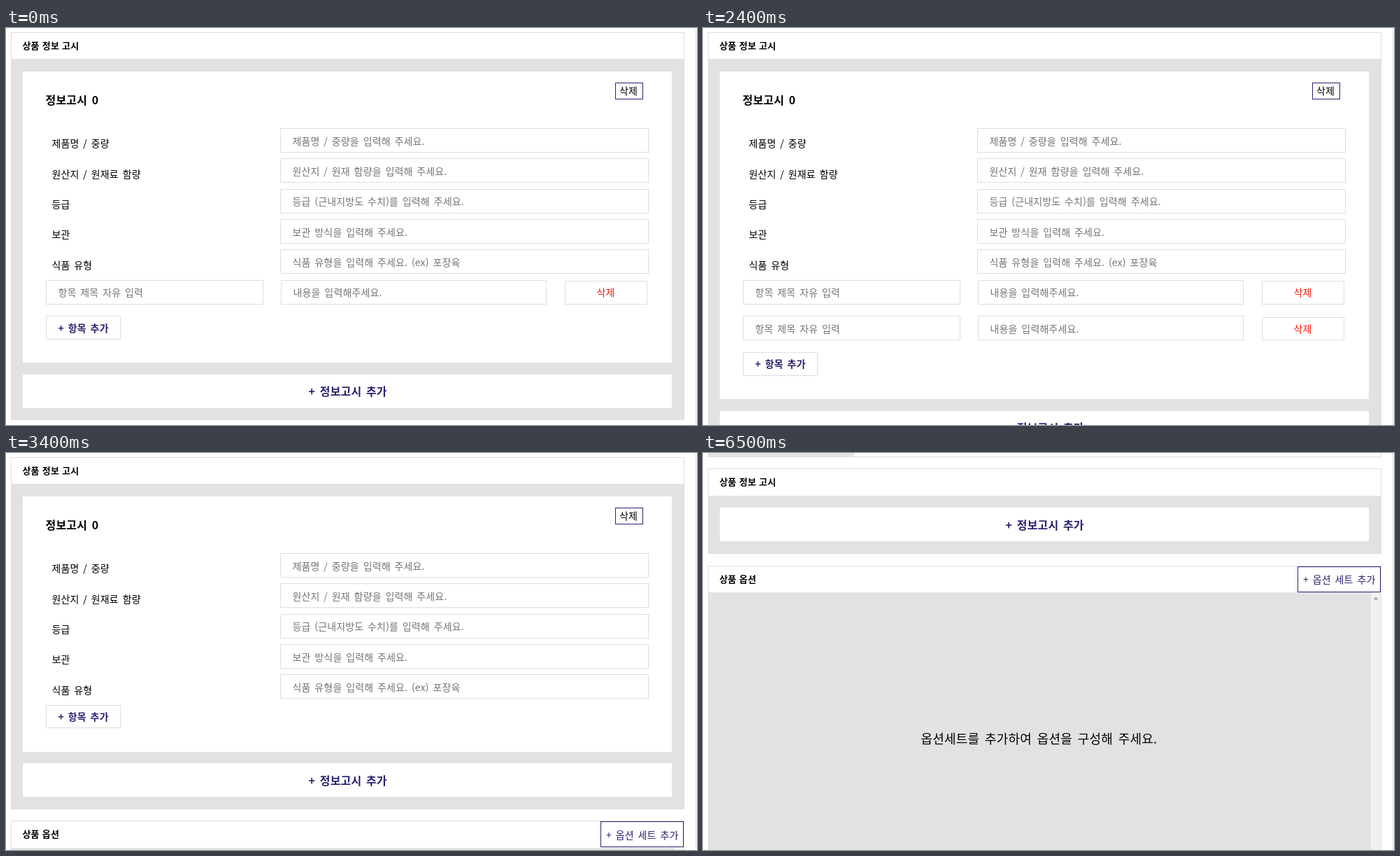
An HTML page with a canvas for the animation above (7.4 s loop, 988 by 567 pixels).

```html
<!DOCTYPE html>
<html lang="ko">
<head>
<meta charset="utf-8">
<title>상품 정보 고시</title>
<style>
html, body { margin: 0; width: 100%; height: 100%; overflow: hidden; background: #fff; }
canvas { display: block; }
</style>
</head>
<body>
<canvas id="stage" width="988" height="567"></canvas>
<script>
const ctx = document.getElementById('stage').getContext('2d');
const FONT = '"Noto Sans CJK KR", "Noto Sans CJK", "Noto Sans CJK JP", sans-serif';
const GRAY = '#e2e2e2', LINE = '#dedede', NAVY = '#28236f', HINT = '#757575';
const LOOP = 7400;
const PAD = 16.8, GAP = 16.85, CARD_H = 364.9, ITEM_H = 51.6, ADD_H = 48, HEAD_H = 38.4;

const FIELDS = [
  ['제품명 / 중량', '제품명 / 중량을 입력해 주세요.'],
  ['원산지 / 원재료 함량', '원산지 / 원재 함량을 입력해 주세요.'],
  ['등급', '등급 (근내지방도 수치)를 입력해 주세요.'],
  ['보관', '보관 방식을 입력해 주세요.'],
  ['식품 유형', '식품 유형을 입력해 주세요. (ex) 포장육']
];

// cards: number of free-form items in each notice card
const STATES = [
  { at: 0, cards: [1] },
  { at: 800, cards: [2] },
  { at: 1600, cards: [3] },
  { at: 2400, cards: [2] },
  { at: 2900, cards: [1] },
  { at: 3400, cards: [0] },
  { at: 4300, cards: [0, 0] },
  { at: 5800, cards: [0] },
  { at: 6500, cards: [], shift: 16.8 }
];

function fill(x, y, right, bottom, color) {
  const top = Math.round(y);
  ctx.fillStyle = color;
  ctx.fillRect(x, top, right - x, Math.round(bottom) - top);
}

function frame(x, y, right, bottom, color = LINE) {
  const top = Math.round(y);
  ctx.strokeStyle = color;
  ctx.lineWidth = 1;
  ctx.strokeRect(x + 0.5, top + 0.5, right - x - 1, Math.round(bottom) - top - 1);
}

function text(str, x, middle, { size = 14, color = '#000', bold = false, space = 0.18 } = {}) {
  ctx.font = `${bold ? 'bold ' : ''}${size}px ${FONT}`;
  ctx.letterSpacing = size * 0.01 + 'px';
  ctx.wordSpacing = size * space + 'px';
  ctx.fillStyle = color;
  ctx.fillText(str, x - 0.5, Math.round(middle + size * 0.37));
}

function panel(top, bottom, title) {
  fill(7, top, 970, bottom, '#fff');
  fill(7, top + HEAD_H, 970, bottom, GRAY);
  frame(7, top, 970, bottom);
  text(title, 24, top + 19.2, { size: 13, bold: true, space: 0.08 });
}

function itemRow(y) {
  frame(57, y, 368, y + 35);
  text('항목 제목 자유 입력', 75, y + 18, { color: HINT });
  frame(393, y, 773, y + 35);
  text('내용을 입력해주세요.', 411, y + 18, { color: HINT });
  frame(799, y + 1.6, 917, y + 35);
  text('삭제', 845, y + 18, { color: '#ff1a0a' });
}

function card(top, index, items) {
  fill(24, top, 952, top + CARD_H + items * ITEM_H, '#fff');
  text('정보고시 ' + index, 57, top + 41.4, { size: 16, bold: true });
  frame(871, top + 16.5, 911, top + 40.2, NAVY);
  text('삭제', 877.5, top + 28.4);
  FIELDS.forEach(([label, hint], i) => {
    const y = top + 81.5 + i * 43.33;
    text(label, 66, y + 22);
    frame(392, y, 919, y + 35);
    text(hint, 410, y + 18.4, { color: HINT });
  });
  let y = top + 298.2;
  for (let i = 0; i < items; i++, y += ITEM_H) itemRow(y);
  frame(57, y, 164, y + 33.6);
  text('+ 항목 추가', 75, y + 17, { color: NAVY, bold: true });
}

function optionPanel(top) {
  panel(top, 600, '상품 옵션');
  frame(850, top + 1, 969, top + 38, NAVY);
  text('+ 옵션 세트 추가', 858.5, top + 20, { color: NAVY });
  fill(955, top + HEAD_H, 969, 600, '#f1f1f1');
  const tip = Math.round(top) + 44.5;
  ctx.fillStyle = '#a0a0a0';
  ctx.beginPath();
  ctx.moveTo(962, tip);
  ctx.lineTo(965.5, tip + 4);
  ctx.lineTo(958.5, tip + 4);
  ctx.fill();
  text('옵션세트를 추가하여 옵션을 구성해 주세요.', 312, top + 248, { size: 18, space: 0.2 });
}

function draw({ cards, shift = 0 }) {
  fill(0, 0, 988, 567, '#fff');
  fill(986, 0, 987, 567, '#dcdcdc');

  // lower edge of the panel above, with its scrollbar thumb
  frame(7, shift - 40, 970, shift - 11);
  fill(7, shift - 30, 216, shift - 12, '#e4e4e4');

  const top = 5.6 + shift, first = 61.6 + shift;
  const addTop = cards.reduce((y, n) => y + CARD_H + n * ITEM_H + PAD, first);
  const bottom = addTop + ADD_H + 17.3;
  panel(top, bottom, '상품 정보 고시');
  let y = first;
  cards.forEach((n, i) => {
    card(y, i, n);
    y += CARD_H + n * ITEM_H + PAD;
  });
  fill(24, addTop, 952, addTop + ADD_H, '#fff');
  text('+ 정보고시 추가', 433, addTop + 24.5, { size: 16, color: NAVY, bold: true });
  optionPanel(bottom + GAP);
}

const start = performance.now();
function tick() {
  const t = (performance.now() - start) % LOOP;
  draw(STATES.filter(s => s.at <= t).pop());
  requestAnimationFrame(tick);
}
tick();
</script>
</body>
</html>
```
